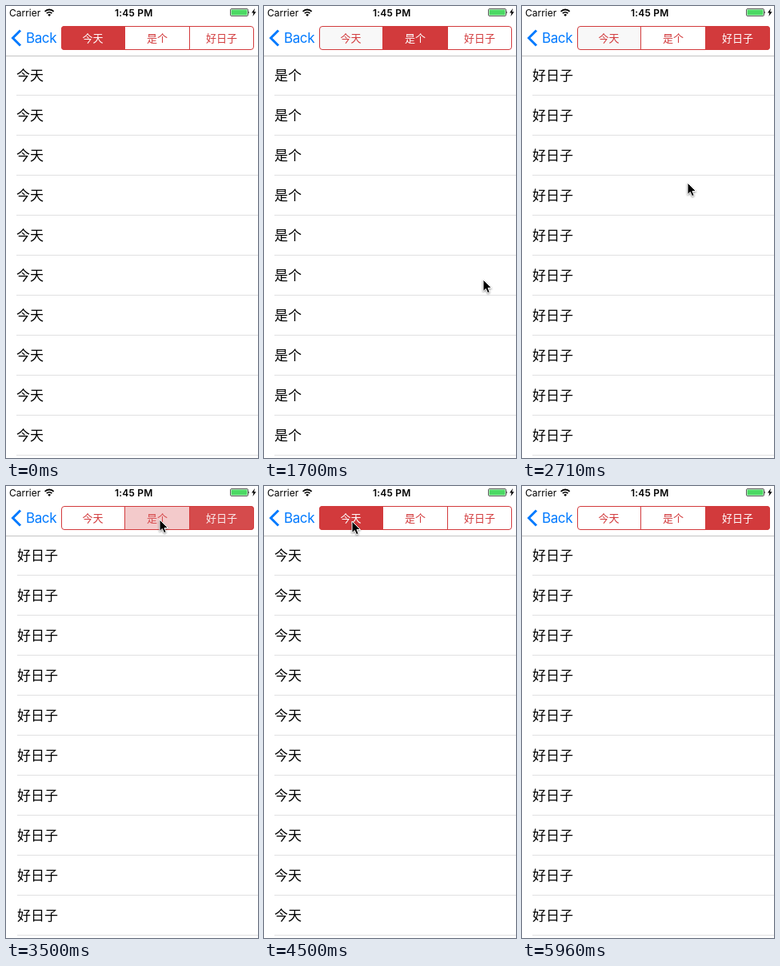
Recreate the animation shown at these times as an HTML page. Size 315 by 565 pixels, loop 7050 ms.

```html
<!DOCTYPE html>
<html lang="zh-CN">
<head>
<meta charset="utf-8">
<title>Segmented pages</title>
<style>
  html, body { margin: 0; width: 100%; height: 100%; overflow: hidden; background: #fff; }
  svg { display: block; width: 315px; height: 565px; }
  text { font-family: Inter, "Noto Sans CJK SC", "Noto Sans CJK", sans-serif; }
  .cjk { font-family: "Noto Sans CJK SC", "Noto Sans CJK", sans-serif; }
  .row { font-size: 17px; }
  .seg { font-size: 13px; text-anchor: middle; }
  #cursor { filter: drop-shadow(0 1px 1px rgba(0, 0, 0, .45)); }
</style>
</head>
<body>
<svg viewBox="0 0 315 565">
  <defs><clipPath id="round"><rect x="69" y="25" width="241" height="30" rx="4"/></clipPath></defs>
  <g id="pages"></g>

  <rect y="62" width="315" height="1" fill="#c3c3c4"/>
  <text x="4" y="12.5" font-size="12">Carrier</text>
  <g fill="none" stroke="#000" stroke-width="1.8">
    <path d="M48.6 6.8a7.7 7.7 0 0 1 11 0M50.8 9.2a4.7 4.7 0 0 1 6.6 0"/>
    <path d="M54.1 13l-1.9-2a2.8 2.8 0 0 1 3.8 0z" fill="#000" stroke="none"/>
  </g>
  <text x="159.7" y="12.5" font-size="12" font-weight="600" letter-spacing=".2" text-anchor="middle">1:45 PM</text>
  <rect x="280.5" y="3.5" width="22" height="9" rx="1.5" fill="#fff" stroke="#333" stroke-width=".8"/>
  <rect x="281.5" y="4.5" width="20" height="7" rx=".5" fill="#4cd964"/>
  <path d="M303.3 6.3q1.6 1.7 0 3.4z"/>
  <path d="M311 3l-4 5.6h2.4L308.4 13l4.2-5.8h-2.5z"/>

  <path d="M18 30.5L8.5 40l9.5 9.5" fill="none" stroke="#007aff" stroke-width="3"/>
  <text x="25" y="46" font-size="17" letter-spacing="-.4" fill="#007aff">Back</text>

  <g id="segments" clip-path="url(#round)"></g>
  <path d="M148.5 25v30M229.5 25v30" stroke="#d23a3c"/>
  <rect x="69.5" y="25.5" width="240" height="29" rx="3.5" fill="none" stroke="#d23a3c"/>
  <g id="labels"></g>

  <path id="cursor" d="M0 0v14.6l3.3-3.1 2.3 5.2 2.6-1.1-2.2-5.1h4.5z" stroke="#fff" stroke-width="1"/>
</svg>
<script>
const LOOP = 7050, PAGE = 320, FADE = 130, PRESS = 20;
const RED = [210, 58, 60];
const titles = ['今天', '是个', '好日子'];
const bounds = [69, 148, 229, 310];
const centers = [108.5, 189, 269.5];

const linear = p => p;
const inOut = p => (1 - Math.cos(Math.PI * p)) / 2;
const out = p => 1 - (1 - p) ** 3;

// Keys: time, value(s), easing used to arrive there
const scroll = [
  [0, [0]], [980, [0]], [1180, [116], inOut], [1300, [116]], [1640, [320], out],
  [2080, [320]], [2220, [452], inOut], [2400, [452]], [2690, [640], out],
  [3490, [640]], [3790, [320], inOut], [4195, [320]], [4495, [0], inOut],
  [5200, [0]], [5500, [640], inOut], [LOOP, [640]]
];
const pointer = [
  [0, [322, 333]], [530, [322, 333]], [650, [294, 328], out], [980, [294, 328]],
  [1180, [163, 317], inOut], [1300, [163, 317]], [1640, [274, 342], inOut], [2080, [274, 342]],
  [2220, [136, 325], inOut], [2400, [136, 325]], [2710, [207, 222], inOut], [3090, [210, 73], out],
  [3260, [192, 42], out], [3500, [192, 42]], [3560, [186, 42]], [3830, [186, 42]],
  [3970, [110, 44], out], [4540, [110, 44]], [4890, [267, 44], inOut], [4970, [281, 44], out],
  [5870, [281, 44]], [5940, [290, 64]], [5960, [322, 70]], [LOOP, [322, 70]]
];
// Selection changes: time, segment, tapped
const picks = [[0, 0], [1700, 1], [2700, 2], [3490, 1, true], [4195, 0, true], [5200, 2, true]];

function track(keys, t) {
  const k = keys.findIndex(key => key[0] > t);
  const [t0, a] = keys[k - 1], [t1, b, ease = linear] = keys[k];
  const p = ease((t - t0) / (t1 - t0));
  return a.map((v, i) => v + (b[i] - v) * p);
}

function add(parent, tag, attrs, text = '') {
  const el = document.createElementNS('http://www.w3.org/2000/svg', tag);
  for (const name in attrs) el.setAttribute(name, attrs[name]);
  el.textContent = text;
  return parent.appendChild(el);
}

const byId = id => document.getElementById(id);
const cursor = byId('cursor');

const pages = titles.map(title => {
  const page = add(byId('pages'), 'g', {});
  for (let y = 62; y < 562; y += 50) {
    add(page, 'text', { x: 13, y: y + 30.5, class: 'cjk row' }, title);
    add(page, 'rect', { x: 13, y: y + 49, width: 305, height: 1, fill: '#e0e0e2' });
  }
  return page;
});

const segments = titles.map((title, i) => {
  const box = { x: bounds[i], y: 25, width: bounds[i + 1] - bounds[i] + 1, height: 30 };
  return {
    base: add(byId('segments'), 'rect', { ...box, fill: '#fff' }),
    tint: add(byId('segments'), 'rect', { ...box, fill: `rgb(${RED})` }),
    label: add(byId('labels'), 'text', { x: centers[i], y: 45, class: 'cjk seg' }, title)
  };
});

function drawSegments(t) {
  const k = picks.findLastIndex(pick => pick[0] <= t);
  const [start, current, tapped] = picks[k];
  const previous = k ? picks[k - 1][1] : -1;
  const next = picks[k + 1];
  const p = tapped ? Math.min(1, (t - start) / FADE) : 1;
  segments.forEach(({ tint, label }, i) => {
    const selected = i === current ? p : i === previous ? 1 - p : 0;
    const pressed = next && next[2] && i === next[1] && t > next[0] - PRESS;
    const level = i === current && tapped ? .2 + .8 * p : pressed ? .2 : selected;
    tint.setAttribute('fill-opacity', level);
    label.setAttribute('fill', `rgb(${RED.map(c => c + (255 - c) * selected)})`);
  });
  segments[0].base.setAttribute('fill', t >= 1700 && t < 3490 ? '#f8f8f8' : '#fff');
}

function draw(now) {
  const t = now % LOOP;
  const [offset] = track(scroll, t);
  pages.forEach((page, i) => page.setAttribute('transform', `translate(${Math.round(i * PAGE - offset)} 0)`));
  drawSegments(t);
  cursor.setAttribute('transform', `translate(${track(pointer, t).map(Math.round)})`);
  requestAnimationFrame(draw);
}

const begin = performance.now();
const frame = draw;
draw = now => frame(Math.max(0, now - begin));
requestAnimationFrame(draw);
</script>
</body>
</html>
```
